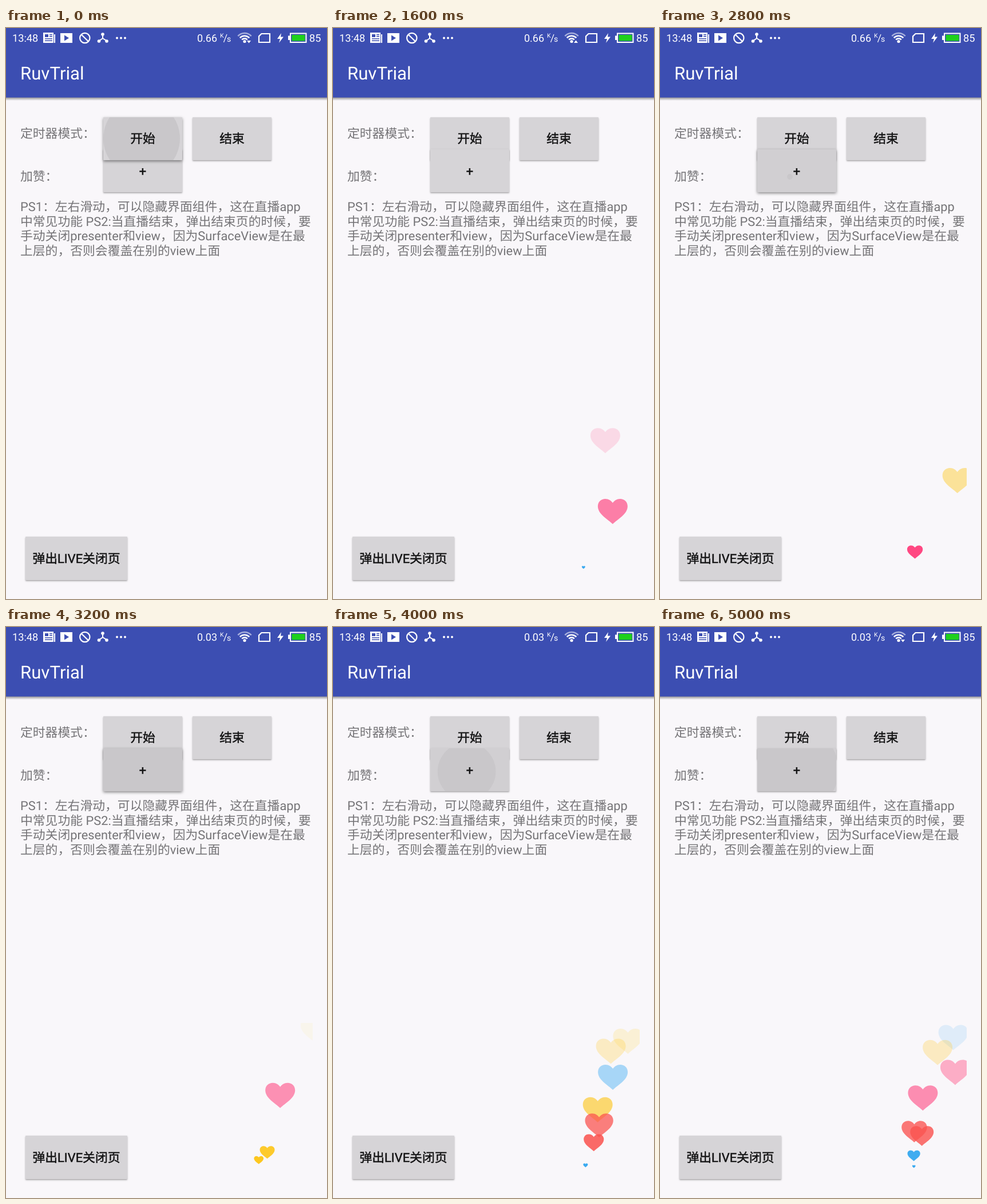
Animation, 561 px wide and 998 px high, one loop 5100 ms. Source, as an HTML page with a canvas:

```html
<!DOCTYPE html>
<html lang="zh-CN">
<head>
<meta charset="utf-8">
<title>Floating hearts</title>
<style>
html, body { margin: 0; width: 100%; height: 100%; overflow: hidden; background: #f9f7fa; }
canvas { display: block; }
</style>
</head>
<body>
<canvas id="stage" width="561" height="998"></canvas>
<script>
const ctx = document.getElementById('stage').getContext('2d');
ctx.textRendering = 'geometricPrecision';
const FONT = 'Roboto, "Noto Sans CJK SC", "Noto Sans CJK", sans-serif';
const BODY = 21.82;
const LOOP = 5100, STEP = 100, LIFE = 1300, GROW = 480;
const PINK = '#ff3a78', RED = '#fb5350', YELLOW = '#fdc71f', BLUE = '#3aaaf0';

// Birth time, colour, x of the three later curve points
const hearts = [
  [545, PINK, 410, 450, 505],
  [1045, PINK, 466, 535, 535],
  [1545, BLUE, 390, 460, 534],
  [2045, YELLOW, 473, 558, 538],
  [2548, PINK, 426, 530, 520],
  [2960, YELLOW, 460, 518, 525],
  [3045, YELLOW, 430, 485, 510],
  [3230, BLUE, 431, 514, 535],
  [3440, YELLOW, 430, 500, 529],
  [3545, RED, 444, 517, 530],
  [3675, RED, 450, 500, 530],
  [3925, BLUE, 424, 487, 541],
  [4055, YELLOW, 403, 487, 520],
  [4197, PINK, 469, 552, 520],
  [4364, PINK, 430, 478, 515],
  [4590, RED, 423, 480, 520],
  [4622, RED, 444, 510, 520],
  [4795, BLUE, 440, 455, 510],
  [4948, BLUE, 440, 470, 500],
];
const taps = [2960, 3230, 3440, 3675, 3925, 4197, 4364, 4622, 4795, 4948];
const heartPath = new Path2D('M0 22C-8 14-26 5-26-9C-26-17-20-22-13-22C-7-22-3-19 0-15C3-19 7-22 13-22C20-22 26-17 26-9C26 5 8 14 0 22Z');

const bezier = (u, a, b, c, d) => {
  const v = 1 - u;
  return v * v * v * a + 3 * v * v * u * b + 3 * v * u * u * c + u * u * u * d;
};

function text(str, x, y, size, color, align = 'left') {
  ctx.font = `${size}px ${FONT}`;
  ctx.textAlign = align;
  ctx.fillStyle = color;
  ctx.fillText(str, x, y);
}

// Button labels are slightly heavier than the body text
function label(str, x, y) {
  text(str, x, y, BODY, '#121213', 'center');
  ctx.strokeStyle = '#121213';
  ctx.lineWidth = .5;
  ctx.strokeText(str, x, y);
}

function rect(x, y, w, h, color) {
  ctx.fillStyle = color;
  ctx.fillRect(x, y, w, h);
}

function disc(x, y, r) {
  ctx.beginPath();
  ctx.arc(x, y, r, 0, 7);
  ctx.fill();
}

function line(d, width = 2) {
  ctx.lineWidth = width;
  ctx.stroke(new Path2D(d));
}

function button(x, y, w, h, str, { color = '#d6d4d7', raised = false, ripples = [], dark = 1, baseline = 45 } = {}) {
  const box = new Path2D();
  box.roundRect(x, y, w, h, 1);
  ctx.save();
  ctx.shadowColor = raised ? 'rgba(0,0,0,.45)' : 'rgba(0,0,0,.35)';
  ctx.shadowBlur = raised ? 5 : 2.5;
  ctx.shadowOffsetY = raised ? 2 : 1.5;
  ctx.fillStyle = color;
  ctx.fill(box);
  ctx.restore();

  ctx.save();
  ctx.clip(box);
  ctx.globalAlpha = dark;
  ctx.fillStyle = '#c9c7ca';
  ctx.beginPath();
  for (const [cx, cy, r] of ripples) {
    ctx.moveTo(cx + r, cy);
    ctx.arc(cx, cy, r, 0, 7);
  }
  ctx.fill();
  ctx.restore();
  label(str, x + w / 2, y + baseline);
}

function wifi(t) {
  ctx.lineWidth = 2.6;
  [16, 11.3, 6.6].forEach((r, i) => {
    ctx.globalAlpha = i ? 1 : .55;
    ctx.beginPath();
    ctx.arc(417, 25, r, -Math.PI * .76, -Math.PI * .24);
    ctx.stroke();
  });
  ctx.globalAlpha = 1;
  disc(417, 23.5, 2.6);
  if (t < 1000 || t >= 2000 && t < 2500 || t >= 4700) ctx.fill(new Path2D('M421 22h7l-3.5 4.5z'));
  else if (t < 2000) ctx.fill(new Path2D('M421 26h7l-3.5-4.5z'));
}

function statusBar(t) {
  const white = '#fff', blue = '#3c4eb2';
  text('13:48', 11, 24, 18.2, white);
  text(t < 3000 ? '0.66' : '0.03', 334, 24, 18, white);
  text('K', 374, 17, 10.5, white);
  text('s', 386, 24, 14, white);
  text('85', 530, 24, 18.2, white);
  ctx.strokeStyle = white;
  line('M380.5 25L386 11', 1.2);

  rect(65, 8, 18, 18, white);
  rect(84, 11, 2, 15, white);
  rect(68, 11, 6, 5, blue);
  for (const [x, y, w] of [[76, 11, 5], [76, 14, 5], [68, 18, 13], [68, 21.5, 13]]) rect(x, y, w, 1.5, blue);

  rect(95, 9, 21, 17, white);
  ctx.fillStyle = blue;
  ctx.fill(new Path2D('M102 12.5v10l8-5z'));

  line('M146.5 17.5a8.7 8.7 0 1 0-17.4 0a8.7 8.7 0 1 0 17.4 0M131.7 11.5L144 23.5', 2.2);
  line('M169 11v7L162 23M169 18L177 23', 2);
  ctx.fillStyle = white;
  for (const [x, y] of [[169, 11], [162.5, 23], [176, 23]]) disc(x, y, 2.8);
  for (const x of [194, 201, 208]) disc(x, 17.5, 2);

  wifi(t);
  line('M446.5 10H461V25H442V14.5Z', 2.2);
  ctx.fill(new Path2D('M481 9L474 19H479L477 26L485 15.5H480Z'));
  line('M497 9.5H524.5V25H497Z', 2);
  rect(493, 13.5, 3, 7.5, white);
  rect(499.5, 12, 23, 10.5, '#1fd01c');
}

function page(t) {
  rect(0, 0, 561, 998, '#f9f7fa');
  const shade = ctx.createLinearGradient(0, 121, 0, 127);
  shade.addColorStop(0, 'rgba(0,0,0,.42)');
  shade.addColorStop(1, 'rgba(0,0,0,0)');
  rect(0, 121, 561, 6, shade);
  rect(0, 0, 561, 121.5, '#3c4eb2');
  statusBar(t);
  text('RuvTrial', 25, 90, 31.16, '#fff');

  const grey = '#757477';
  text('定时器模式：', 25, 192, BODY, grey);
  text('加赞：', 25, 267, BODY, grey);
  [
    'PS1：左右滑动，可以隐藏界面组件，这在直播app',
    '中常见功能 PS2:当直播结束，弹出结束页的时候，要',
    '手动关闭presenter和view，因为SurfaceView是在最',
    '上层的，否则会覆盖在别的view上面',
  ].forEach((row, i) => text(row, 25, Math.round(320 + i * 25.5), BODY, grey));
}

function buttons(t) {
  const start = () => button(170, 156, 138, 75, '开始', {
    raised: t < 200,
    ripples: t < 300 ? [[237, 193, 67 + t * .2]] : [],
    dark: 1 - t / 300,
  });
  const plus = () => button(170, 212, 138, 75, '+', {
    color: t < 2800 ? '#d6d4d7' : '#d1cfd2',
    raised: taps.some(tap => t >= tap - 160 && t <= tap + 50),
    ripples: taps.map(tap => t - tap + 160).filter(age => age >= 0 && age < 450).map(age => {
      const k = Math.min(1, age / 320);
      return [227 + 9 * k, 260 - 10 * k, 5 + age * .195];
    }),
    baseline: 46,
  });
  // The pressed button lies on top
  (t < 300 ? [plus, start] : [start, plus]).forEach(draw => draw());
  button(326, 156, 138, 75, '结束');
  button(34, 889, 178, 76, '弹出LIVE关闭页', { baseline: 46 });
}

function drawHearts(t) {
  ctx.save();
  ctx.beginPath();
  ctx.rect(380, 692, 156, 258);
  ctx.clip();
  for (const [birth, color, x1, x2, x3] of hearts) {
    const age = t - birth, u = age / LIFE;
    if (u < 0 || u > 1) continue;
    const size = Math.min(1, age / GROW);
    ctx.save();
    ctx.translate(bezier(u, 444, x1, x2, x3), bezier(u, 946, 928, 711, 692));
    ctx.scale(size, size);
    ctx.globalAlpha = Math.max(0, Math.min(1, 1.17 - 1.25 * u));
    ctx.fillStyle = color;
    ctx.fill(heartPath);
    ctx.restore();
  }
  ctx.restore();
}

function frame() {
  const t = Math.floor(performance.now() % LOOP / STEP) * STEP;
  page(t);
  buttons(t);
  drawHearts(t);
  requestAnimationFrame(frame);
}
frame();
</script>
</body>
</html>
```
